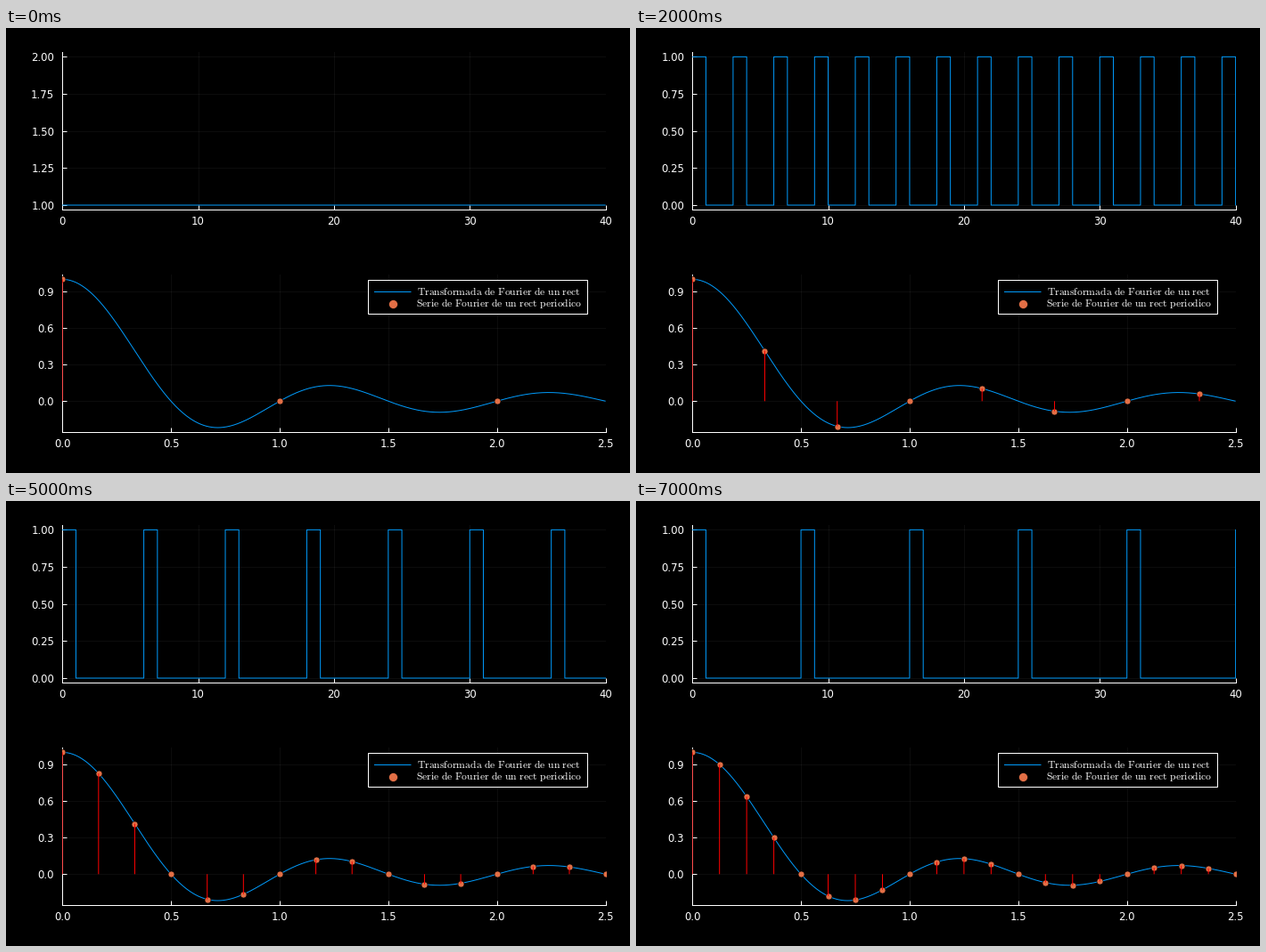
Animation of 700 by 500 pixels, one loop 8 s. Source, as a matplotlib script:

```python
import numpy as np
import matplotlib.pyplot as plt
from matplotlib.animation import FuncAnimation
from matplotlib.patches import Rectangle

W, H, DPI = 700, 500, 100
PX = 72 / DPI  # points per pixel
LEFT, WIDTH, HEIGHT = 63.2, 609.4, 176.6
FONT = 11.6 * PX
BLUE, ORANGE, RED = "#009afa", "#e26f46", "#ff0000"

plt.rcParams["font.family"] = "DejaVu Sans"
plt.rcParams["mathtext.fontset"] = "cm"

fig = plt.figure(figsize=(W / DPI, H / DPI), dpi=DPI, facecolor="black")


def make_axes(bottom, xticks, fmt):
    ax = fig.add_axes([LEFT / W, 1 - bottom / H, WIDTH / W, HEIGHT / H],
                      facecolor="black")
    ax.set_axisbelow(True)
    ax.set_xlim(0, xticks[-1])
    ax.set_xticks(xticks, [fmt.format(x) for x in xticks])
    ax.grid(color="white", alpha=0.05, lw=PX)
    ax.tick_params(direction="in", length=5 * PX, width=PX, color="white",
                   labelcolor="white", labelsize=FONT)
    ax.tick_params(axis="x", pad=7 * PX)
    ax.tick_params(axis="y", pad=9 * PX)
    for side, spine in ax.spines.items():
        spine.set(visible=side in ("left", "bottom"), color="white",
                  linewidth=PX, zorder=1)
    return ax


def add_line(ax, x, y, color, zorder=2):
    """Antialiased line one pixel wide, not rounded to whole pixels."""
    line, = ax.plot(x, y, color=color, lw=PX, snap=False, zorder=zorder,
                    solid_capstyle="butt")
    return line


def set_wave_scale(low):
    ticks = low + np.arange(5) / 4
    wave_ax.set_ylim(low - 0.03, low + 1.03)
    wave_ax.set_yticks(ticks, [f"{t:.2f}" for t in ticks])


def spectrum(f):
    return np.sinc(2 * f)


def pulse_train(period):
    """Corner points of unit pulses repeating every period."""
    if period == 1:
        return [0, 40], [1, 1]
    starts = np.arange(0, 41, period)
    x = np.column_stack([starts, starts, starts + 1, starts + 1]).ravel()
    y = np.tile([0, 1, 1, 0], len(starts))
    return np.append(x[1:], 50), np.append(y[1:], 0)


# Pulse train on top
wave_ax = make_axes(204, np.arange(0, 41, 10), "{:.0f}")
wave = add_line(wave_ax, [], [], BLUE)

# Spectrum below
freq = np.linspace(0, 2.5, 600)
curve = spectrum(freq)
margin = 0.03 * np.ptp(curve)
spec_ax = make_axes(454, np.arange(0, 2.6, 0.5), "{:.1f}")
spec_ax.set_ylim(curve.min() - margin, curve.max() + margin)
levels = [0, 0.3, 0.6, 0.9]
spec_ax.set_yticks(levels, [f"{v:.1f}" for v in levels])
add_line(spec_ax, freq, curve, BLUE)
dots, = spec_ax.plot([], [], "o", color=ORANGE, ms=7 * PX, mec="black",
                     mew=0.6 * PX, zorder=3)
stems = add_line(spec_ax, [], [], RED, zorder=4)

# Legend in pixel coordinates
legend = fig.add_axes([0, 0, 1, 1], zorder=5)
legend.set(xlim=(0, W), ylim=(H, 0))
legend.axis("off")
legend.add_patch(Rectangle((406.1, 283.1), 246, 38.2, fc="black",
                           ec="white", lw=PX))
add_line(legend, [413, 454.5], [296.5, 296.5], BLUE)
legend.plot([433.5], [309.5], "o", color=ORANGE, ms=10 * PX, mec="black",
            mew=0.6 * PX)
rows = [(460.6, 300.5, "Transformada de Fourier de un rect"),
        (460, 313, "Serie de Fourier de un rect periodico")]
for x, y, label in rows:
    # Empty groups switch off kerning after the wide capitals
    label = label.replace("T", "T{}").replace("F", "F{}")
    legend.text(x, y, r"$\mathrm{%s}$" % label.replace(" ", r"\ "),
                color="white", size=11.7 * PX, va="baseline")


def draw(i):
    period = i + 1
    set_wave_scale(1 if period == 1 else 0)
    wave.set_data(*pulse_train(period))

    f = np.arange(int(2.5 * period) + 1) / period
    c = spectrum(f)
    dots.set_data(f, c)
    gap = np.full(len(f), np.nan)
    stems.set_data(np.repeat(f, 3),
                   np.column_stack([0 * c, c, gap]).ravel())
    return wave, dots, stems


anim = FuncAnimation(fig, draw, frames=8, interval=1000, repeat=True,
                     repeat_delay=0, init_func=lambda: draw(0), blit=False)
plt.show()
```
